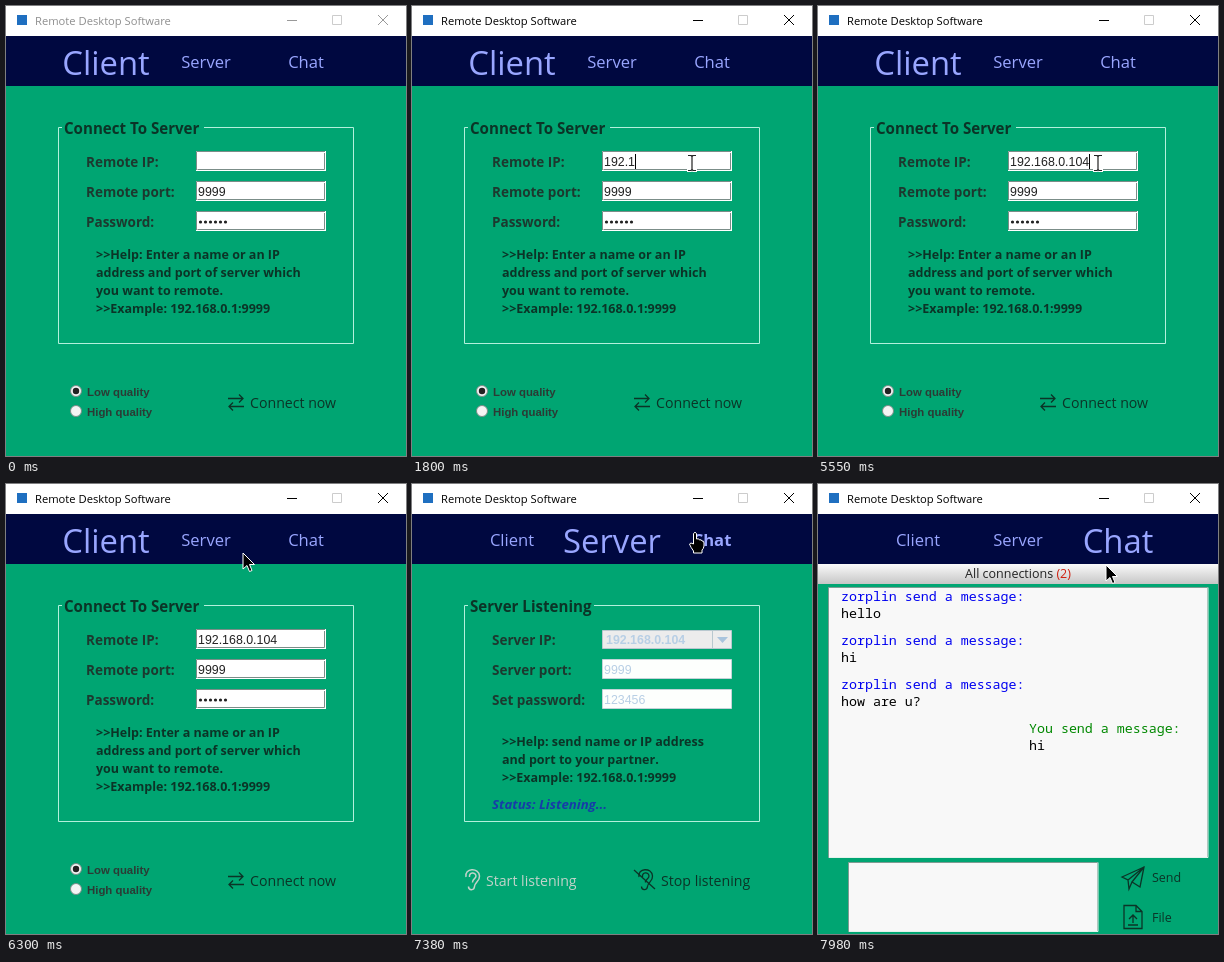
These frames come from a looping animation (400x450 px, 8 s). An HTML page:

```html
<!DOCTYPE html>
<html lang="en">
<head>
<meta charset="utf-8">
<title>Remote Desktop Software</title>
<style>
  html, body { margin: 0; width: 100%; height: 100%; overflow: hidden; background: #00a572; }
  svg { display: block; }
  text { font-family: "Open Sans", "Noto Sans", sans-serif; fill: #0b3427; white-space: pre; }
  #tabs text { fill: #99a6ff; text-anchor: middle; }
  .heading { font-size: 15.1px; font-weight: 700; }
  .label { font-size: 13.5px; font-weight: 700; fill: #1c392f; }
  .help { font-size: 12.5px; font-weight: 700; }
  .status { font-size: 13.2px; font-weight: 700; font-style: italic; fill: #163ca8; }
  .action { font-size: 14.15px; }
  .small { font-size: 12.5px; }
  .value, .radio { font-family: "Liberation Sans", Arial, sans-serif; }
  .value { font-size: 12.4px; fill: #222; }
  .radio { font-size: 11.4px; font-weight: 700; fill: #2b3b35; }
  .disabled { fill: #b8cfe5; }
  .chat text { font: 13.3px "Noto Sans Mono", monospace; fill: #000; }
  .chat .them { fill: #0000f0; }
  .chat .me { fill: #008800; }
  .line { fill: none; stroke: #0b3427; stroke-width: 1.3; }
  .faded { fill: #c3d3cb; }
</style>
</head>
<body>
<svg width="400" height="450" viewBox="0 0 400 450">
  <defs>
    <linearGradient id="bar" x2="0" y2="1">
      <stop stop-color="#fafafa"/><stop offset="1" stop-color="#c6c6c6"/>
    </linearGradient>
    <g id="field">
      <path d="M190 145h130v20h-130z" fill="#fff"/>
      <path d="M190.500 164v-18.500h128.500M318.500 147v16.500h-127" fill="none" stroke="#7b8d88"/>
    </g>
    <path id="flatField" d="M190.500 145.500h129v19h-129z" fill="#fdfffd" stroke="#c4d3d8"/>
    <path id="ear" d="M54 393c-2-9 13-10 13.500-1c.5 5-4.500 6-5 10.500c-.5 4.500-6 4-6 0M57.500 393c-.5-5 6-5.500 6.500-1c0 3-4 3-3.500 6.500"/>
  </defs>

  <rect width="400" height="450" fill="#00a572"/>

  <g id="clientPage">
    <path d="M56 121.500h-3.500v216h295v-216H198" fill="none" stroke="#b3f0dc"/>
    <text class="heading" x="58" y="128">Connect To Server</text>
    <text class="label" x="80" y="161">Remote IP:</text>
    <text class="label" x="80" y="191">Remote port:</text>
    <text class="label" x="80" y="221">Password:</text>
    <use href="#field"/><use href="#field" y="30"/><use href="#field" y="60"/>
    <text class="value" id="address" x="192" y="160"></text>
    <rect id="caret" y="148" width="1" height="15" fill="#000"/>
    <text class="value" x="192" y="190">9999</text>
    <path d="M194.500 216h26" stroke="#222" stroke-width="3.200" stroke-linecap="round" stroke-dasharray="0 5"/>
    <text class="help" x="90" y="253">&gt;&gt;Help: Enter a name or an IP</text>
    <text class="help" x="90" y="271">address and port of server which</text>
    <text class="help" x="90" y="289">you want to remote.</text>
    <text class="help" x="90" y="307">&gt;&gt;Example: 192.168.0.1:9999</text>
    <g fill="#f4f4f4" stroke="#7b8d88">
      <circle cx="70" cy="385" r="5.500"/><circle cx="70" cy="405" r="5.500"/>
    </g>
    <circle cx="70" cy="385" r="3.200" fill="#222"/>
    <text class="radio" x="81" y="389.500">Low quality</text>
    <text class="radio" x="81" y="409.500">High quality</text>
    <path class="line" d="M222 392.500h15m-4-4l4 4l-4 4M238 400.500h-15m4-4l-4 4l4 4"/>
    <text class="action" x="244" y="402">Connect now</text>
  </g>

  <g id="serverPage">
    <path d="M56 121.500h-3.500v216h295v-216H182" fill="none" stroke="#b3f0dc"/>
    <text class="heading" x="58" y="128">Server Listening</text>
    <text class="label" x="80" y="161">Server IP:</text>
    <text class="label" x="80" y="191">Server port:</text>
    <text class="label" x="80" y="221">Set password:</text>
    <path d="M190.500 146.500h129v18h-129z" fill="#ececec" stroke="#b8c8cf"/>
    <path d="M300.500 147v17" stroke="#b8c8cf"/>
    <path d="M305 153h11l-5.500 6z" fill="#a9c4dd"/>
    <text class="value disabled" x="194" y="159.500" font-weight="700">192.168.0.104</text>
    <use href="#flatField" y="30"/><use href="#flatField" y="60"/>
    <text class="value disabled" x="192" y="190">9999</text>
    <text class="value disabled" x="192" y="220">123456</text>
    <text class="help" x="90" y="262">&gt;&gt;Help: send name or IP address</text>
    <text class="help" x="90" y="280">and port to your partner.</text>
    <text class="help" x="90" y="298">&gt;&gt;Example: 192.168.0.1:9999</text>
    <text class="status" x="80" y="325">Status: Listening...</text>
    <use href="#ear" fill="none" stroke="#c3d3cb" stroke-width="1.500"/>
    <text class="action faded" x="74" y="402">Start listening</text>
    <use href="#ear" x="173" class="line"/>
    <path class="line" d="M222 386l21 19"/>
    <text class="action" x="249" y="402">Stop listening</text>
  </g>

  <g id="chatPage">
    <rect y="80" width="400" height="20" fill="url(#bar)"/>
    <text class="small" x="200" y="94" text-anchor="middle" style="fill:#222">All connections <tspan fill="#d02010">(2)</tspan></text>
    <path d="M10.500 103.500h379v270h-379zM30.500 378.500h249v69h-249z" fill="#f8f8f8" stroke="#7f9c93"/>
    <path d="M11 373.500h379v-270M31 447.500h249v-69" fill="none" stroke="#e4f3ec"/>
    <g class="chat">
      <text class="them" x="23" y="117">zorplin send a message:</text>
      <text x="23" y="134">hello</text>
      <text class="them" x="23" y="161">zorplin send a message:</text>
      <text x="23" y="178">hi</text>
      <text class="them" x="23" y="205">zorplin send a message:</text>
      <text x="23" y="222">how are u?</text>
      <text class="me" x="211" y="249">You send a message:</text>
      <text x="211" y="266">hi</text>
    </g>
    <path class="line" d="M304 393l22-10l-4 20l-8-5l-3 7l-1-9zM310 396l16-13l-12 15"/>
    <text class="small" x="334" y="398">Send</text>
    <path class="line" d="M306 421.500h12l6 6v17h-18zM318 421.500v6h6M315 439v-8m-4 4l4-4l4 4M310 441h10"/>
    <text class="small" x="334" y="438">File</text>
  </g>

  <rect width="400" height="30" fill="#fff"/>
  <rect x="11" y="9" width="10" height="10" fill="#1f6fc0"/>
  <text id="title" x="29" y="19" font-size="11.200">Remote Desktop Software</text>
  <path id="buttons" d="M281 14.500h10M372 9l10 10m0-10l-10 10" fill="none"/>
  <path d="M326.500 9.500h9v9h-9z" fill="none" stroke="#ccc"/>
  <rect y="30" width="400" height="50" fill="#000840"/>
  <g id="tabs"><text x="100">Client</text><text x="200">Server</text><text x="300">Chat</text></g>

  <g id="pointer" stroke-linejoin="round">
    <path id="arrow" d="M0 0v16l4-3.500l2.500 6l2.500-1l-2.500-6h5z" stroke="#fff"/>
    <path id="hand" d="M-1.500 11V1.500q1.500-2.500 3 0V7q2.500-1 3 1q2-1 2.500 1q2-.5 2 2v3q-.5 3-2 4v3H-1.500v-2q-3-4-4-7q1-2 4 0z" stroke="#fff"/>
    <g id="beam" fill="none">
      <path d="M-5-7.500h4l1 1l1-1h4M0-7V7M-5 7.500h4l1-1l1 1h4" stroke="#fff" stroke-width="3"/>
      <path d="M-4-7.500h3l1 1l1-1h3M0-7V7M-4 7.500h3l1-1l1 1h3" stroke="#222" stroke-width="1.200"/>
    </g>
  </g>
</svg>
<script>
const LOOP = 8000, TICK = 30, BLINK = 480, FOCUS = 450;
const byId = id => document.getElementById(id);
const pages = ["clientPage", "serverPage", "chatPage"].map(byId);
const tabs = [...byId("tabs").children];
const clamp = v => Math.min(1, Math.max(0, v));

// [time, key]; "<" is backspace
const keys = [
  [930, "1"], [1350, "9"], [1500, "2"], [1650, "."], [1800, "1"], [2100, "6"], [2220, "8"],
  [2820, "."], [3030, "0"], [3270, "."], [3900, "0"], [4320, "<"], [4470, "1"], [4770, "0"], [5550, "4"]
];
// start, end, then a quadratic curve: from, control, to
const moves = [
  [90, 570, [330, 112], [300, 120], [280, 157]],
  [5790, 6510, [280, 157], [310, 70], [197, 62]],
  [6990, 7380, [197, 62], [245, 60], [283, 48]],
  [7380, 7590, [283, 48], [284, 52], [286, 56]],
  [7800, 7980, [286, 56], [287, 68], [288, 81]]
];

function pointerAt(t) {
  const move = moves.filter(m => m[0] <= t).pop();
  if (!move) return null;
  const [start, end, a, b, c] = move;
  const p = clamp((t - start) / (end - start));
  const u = p * p * (3 - 2 * p), v = 1 - u;
  return [0, 1].map(i => v * v * a[i] + 2 * u * v * b[i] + u * u * c[i]);
}

function drawAddress(t) {
  let value = "", lastKey = FOCUS;
  for (const [time, key] of keys) {
    if (time > t) break;
    value = key === "<" ? value.slice(0, -1) : value + key;
    lastKey = time;
  }
  byId("address").textContent = value;
  const width = value ? byId("address").getComputedTextLength() : 0;
  byId("caret").setAttribute("x", Math.floor(192 + width));
  const lit = t >= FOCUS && Math.floor((t - lastKey) / BLINK) % 2 === 0;
  byId("caret").setAttribute("visibility", lit ? "visible" : "hidden");
}

function drawPointer(pos, overTab) {
  byId("pointer").setAttribute("visibility", pos ? "visible" : "hidden");
  if (!pos) return;
  const [x, y] = pos;
  byId("pointer").setAttribute("transform", `translate(${Math.round(x)} ${Math.round(y)})`);
  const shape = overTab ? "hand" : y > 145 && x > 190 && x < 320 ? "beam" : "arrow";
  for (const id of ["arrow", "hand", "beam"])
    byId(id).style.display = id === shape ? "" : "none";
}

function draw(time) {
  const t = Math.floor(time % LOOP / TICK) * TICK;
  const active = t >= FOCUS;
  byId("title").style.fill = active ? "#000" : "#8f8f8f";
  byId("buttons").setAttribute("stroke", active ? "#000" : "#999");

  const scroll = clamp((t - 6570) / 120) + clamp((t - 7710) / 120);
  pages.forEach((page, i) => page.setAttribute("transform", `translate(${(i - scroll) * 400} 0)`));

  const selected = Math.ceil(scroll), pos = pointerAt(t);
  let overTab = false;
  tabs.forEach((tab, i) => {
    const big = i === selected;
    const over = pos && pos[1] > 42 && pos[1] < 74 && Math.abs(pos[0] - 100 * (i + 1)) < (big ? 48 : 24);
    overTab = overTab || over;
    tab.setAttribute("y", big ? 69 : 62);
    tab.style.fontSize = big ? "32.8px" : "16.6px";
    tab.style.fontWeight = over && !big ? 700 : 400;
  });
  drawAddress(t);
  drawPointer(pos, overTab);
}

const begin = performance.now();
function frame() {
  draw(performance.now() - begin);
  requestAnimationFrame(frame);
}
frame();
</script>
</body>
</html>
```
